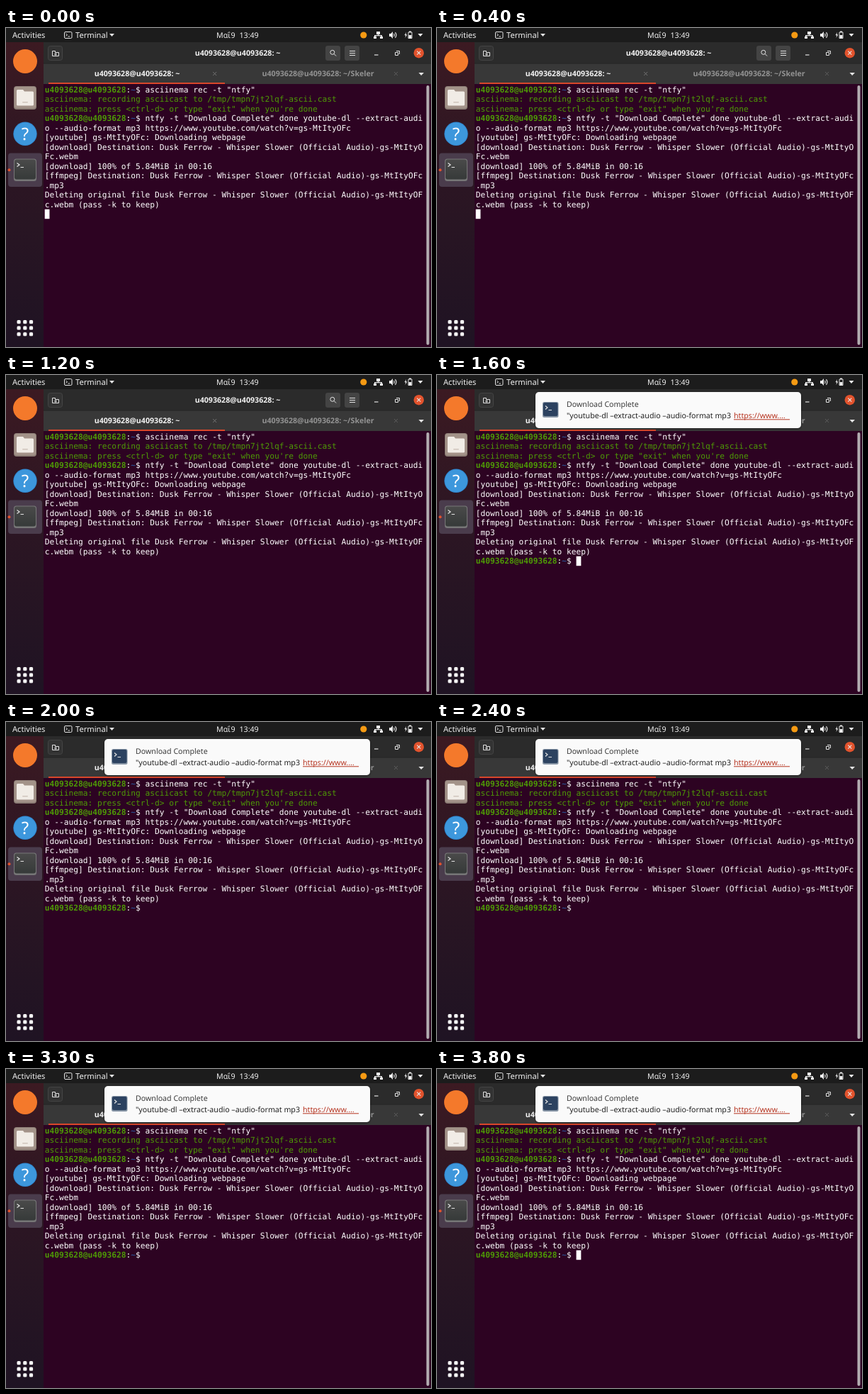
These frames come from a looping animation (600 by 450 pixels, 3900 ms). An HTML page:

```html
<!DOCTYPE html>
<html lang="en">
<head>
<meta charset="utf-8">
<title>Terminal notification</title>
<style>
  html, body { margin: 0; width: 100%; height: 100%; overflow: hidden; background: #2d0322; }
  svg { display: block; width: 600px; height: 450px; }
  text { font: 10.65px "Noto Sans", "Open Sans", sans-serif; fill: #f2f2f2; white-space: pre; text-rendering: geometricPrecision; }
  .mono text { font: 11.225px "DejaVu Sans Mono", monospace; fill: #fff; }
  .mono .user { font-weight: bold; fill: #4e9a06; }
  .mono .info { fill: #4e9a06; }
  .mono .path { fill: #2a62a8; }
  .bold { font-weight: bold; }
  .panel { font-size: 11.15px; }
  .line { fill: none; stroke: #e4e4e4; stroke-width: 1.2; }
  .thin { stroke-width: 1; }
  .faint { stroke: #747474; stroke-width: 1; }
  .button { fill: #444; }
</style>
</head>
<body>
<svg viewBox="0 0 600 450">
  <defs>
    <linearGradient id="dockFill" x2="0" y2="1">
      <stop offset="0" stop-color="#3c1a22"/>
      <stop offset=".4" stop-color="#2d1623"/>
      <stop offset="1" stop-color="#1f1323"/>
    </linearGradient>
    <linearGradient id="darkIcon" x2="0" y2="1">
      <stop offset="0" stop-color="#4a4a4a"/>
      <stop offset="1" stop-color="#363a39"/>
    </linearGradient>
    <filter id="shadow" x="-5%" y="-20%" width="110%" height="150%">
      <feDropShadow dx="0" dy="1" stdDeviation="1.5" flood-opacity=".5"/>
    </filter>
  </defs>
  <rect width="600" height="450" fill="#2d0322"/>

  <g id="window">
    <rect x="53" y="20" width="547" height="30" fill="#2b2b2b"/>
    <rect x="53" y="50" width="547" height="29" fill="#383838"/>
    <path d="M53 50H600" stroke="#222"/>
    <rect x="60" y="77" width="249" height="2" fill="#d9472b"/>
    <rect x="593.5" y="81" width="4" height="366" rx="2" fill="#b3adb1"/>
    <rect x="59.5" y="25.5" width="20" height="20" rx="3" fill="#333" stroke="#444"/>
    <path class="line thin" d="M65.5 39.5V32.5H69.5V34.5H74.5V39.5ZM70 35.2V38.8M68.2 37H71.8"/>
    <rect class="button" x="451" y="25" width="21" height="21" rx="3"/>
    <circle class="line thin" cx="460.8" cy="34.3" r="3"/>
    <path class="line thin" d="M463 36.5L466 39.5"/>
    <rect class="button" x="478" y="25" width="21" height="21" rx="3"/>
    <path class="line thin" d="M485 32.5H493M485 35.5H493M485 38.5H493"/>
    <path class="line" d="M520 38H525.5"/>
    <path class="line thin" d="M549.5 34.5H553.5V38.5H549.5ZM551 32.5H555.5V37"/>
    <circle cx="582.8" cy="35.2" r="7.2" fill="#e2532d"/>
    <path class="line" d="M580.3 32.7L585.3 37.7M585.3 32.7L580.3 37.7"/>
    <text class="bold" x="327" y="39" text-anchor="middle">u4093628@u4093628: ~</text>
    <text class="bold" x="185" y="68.3" text-anchor="middle">u4093628@u4093628: ~</text>
    <text class="bold" x="361.5" y="68.3" style="fill:#929292">u4093628@u4093628: ~/Skeler</text>
    <path class="line faint" d="M292.2 62L297.2 67M297.2 62L292.2 67"/>
    <path class="line faint" d="M548 62L553 67M553 62L548 67" opacity=".6"/>
    <path d="M582.5 63H590L586.2 67Z" fill="#e4e4e4"/>
  </g>

  <g id="screen" class="mono"></g>
  <rect id="cursor" width="6.75" height="13.5" fill="#fff"/>

  <g id="banner">
    <rect x="139" y="24" width="375" height="51" rx="5" fill="#fafafa" filter="url(#shadow)"/>
    <rect x="149" y="38" width="22.5" height="22" rx="2.5" fill="#8795a5"/>
    <rect x="150" y="39" width="20.5" height="19" rx="2" fill="#2c4260"/>
    <path class="line" d="M153 43.5L156 46L153 48.5M157.5 49.5H162"/>
    <text x="183" y="45.3" style="fill:#3b3b3b">Download Complete</text>
    <text x="183" y="61" style="fill:#222">"youtube-dl –extract-audio –audio-format mp3</text>
    <text x="419" y="61" style="fill:#b5331f">https://www.…</text>
    <path d="M419 62.8H498" stroke="#b5331f"/>
  </g>

  <g id="dock">
    <rect y="20" width="53" height="430" fill="url(#dockFill)"/>
    <rect x="3" y="176.5" width="48" height="47.5" rx="4" fill="#4a3c4c"/>
    <circle cx="4.5" cy="200.3" r="2" fill="#e2532d"/>
    <circle cx="27" cy="47" r="17" fill="#f4792b"/>

    <rect x="11" y="82" width="32" height="33" rx="4" fill="#8f8078"/>
    <rect x="12" y="83" width="30" height="30" rx="3" fill="#a39389"/>
    <path d="M15 88.5Q15 87 16.5 87H24L26 89.5H37.5Q39 89.5 39 91V108Q39 109.5 37.5 109.5H16.5Q15 109.5 15 108Z" fill="#f1ece6"/>
    <rect x="23" y="104" width="8" height="1.6" rx=".8" fill="#cfc4bc"/>

    <circle cx="27" cy="149.3" r="16.7" fill="#2f86cf"/>
    <circle cx="27" cy="149.3" r="15.8" fill="#3d97dc"/>
    <text x="27" y="157.8" text-anchor="middle" style="font-size:24px;fill:#fff">?</text>

    <rect x="11" y="184.5" width="32" height="31.5" rx="3.5" fill="#777"/>
    <rect x="12" y="185.5" width="30" height="28" rx="3" fill="url(#darkIcon)"/>
    <path class="line" d="M15.5 190.5L19 193L15.5 195.5M20.5 196.5H25"/>
    <g id="apps" fill="#f5f5f5"></g>
  </g>

  <g id="topBar">
    <rect width="600" height="20" fill="#1c1c1c"/>
    <text class="panel" x="9" y="14">Activities</text>
    <rect class="line thin" x="82.5" y="5.5" width="10.5" height="9" rx="1.5"/>
    <path class="line thin" d="M84.5 8L86.5 9.7L84.5 11.4M87.5 12H90"/>
    <text class="panel" x="98" y="14">Terminal</text>
    <path d="M146 8H153L149.5 12Z" fill="#e4e4e4"/>
    <text x="297" y="13.8">Μαΐ</text>
    <text x="317.5" y="13.8">9</text>
    <text x="329.5" y="13.8">13:49</text>
    <circle cx="504.8" cy="10" r="4.6" fill="#f59a13"/>
    <g fill="#f0f0f0">
      <path d="M523 5H528V9H526V10H531V12H532V15H528V12H529.5V11.2H521.5V12H523V15H519V12H520V10H525V9H523Z"/>
      <path d="M541 8H543.3L546 5V15L543.3 12H541Z"/>
      <path d="M569 4.5H572V6H569ZM568.5 10H572.5V14H568.5Z"/>
      <path d="M565 6L562.5 10.3H564.3L563.5 14L566.2 9.3H564.5Z"/>
      <path d="M581.5 8H588.5L585 12Z"/>
    </g>
    <path class="line thin" d="M568 6H573V14.5H568Z"/>
    <path class="line" d="M547.5 7.8Q549 10 547.5 12.2M549.5 6.2Q552.3 10 549.5 13.8"/>
  </g>
</svg>
<script>
const LOOP = 3900, STEP = 100, DONE = 1300, BLINK = 600;
const LEFT = 54.7, TOP = 80.6, CELL = 6.758, ROW = 13.5;
const byId = id => document.getElementById(id);

function add(parent, tag, attrs, content = "") {
  const node = document.createElementNS("http://www.w3.org/2000/svg", tag);
  for (const name in attrs) node.setAttribute(name, attrs[name]);
  node.textContent = content;
  return parent.appendChild(node);
}

function write(parent, row, column, content, style = "") {
  add(parent, "text", { x: LEFT + column * CELL, y: TOP + row * ROW + 10.2, class: style }, content);
}

function prompt(row, command = "") {
  const line = add(byId("screen"), "g", {});
  write(line, row, 0, "u4093628@u4093628", "user");
  write(line, row, 17, ":");
  write(line, row, 18, "~", "path");
  write(line, row, 19, "$ " + command);
  return line;
}

const title = "Dusk Ferrow - Whisper Slower (Official Audio)-gs-MtItyO";
prompt(0, 'asciinema rec -t "ntfy"');
[
  "asciinema: recording asciicast to /tmp/tmpn7jt2lqf-ascii.cast",
  'asciinema: press <ctrl-d> or type "exit" when you\'re done'
].forEach((line, i) => write(byId("screen"), 1 + i, 0, line, "info"));
prompt(3, 'ntfy -t "Download Complete" done youtube-dl --extract-audi');
[
  "o --audio-format mp3 https://www.youtube.com/watch?v=gs-MtItyOFc",
  "[youtube] gs-MtItyOFc: Downloading webpage",
  "[download] Destination: " + title,
  "Fc.webm",
  "[download] 100% of 5.84MiB in 00:16",
  "[ffmpeg] Destination: " + title + "Fc",
  ".mp3",
  "Deleting original file " + title + "F",
  "c.webm (pass -k to keep)"
].forEach((line, i) => write(byId("screen"), 4 + i, 0, line));
const lastPrompt = prompt(13);

for (let i = 0; i < 9; i++) {
  add(byId("apps"), "rect", { x: 15.5 + i % 3 * 8.7, y: 412 + Math.floor(i / 3) * 8.6, width: 5.2, height: 5.2, rx: 1.5 });
}

const easeOutBack = p => 1 + 2.7 * (p - 1) ** 3 + 1.7 * (p - 1) ** 2;
const show = (node, visible) => node.setAttribute("visibility", visible ? "visible" : "hidden");

function draw(time) {
  const t = Math.floor(time % LOOP / STEP) * STEP;
  const done = t >= DONE;
  const slide = Math.min(1, (t - DONE + 50) / 200);
  const banner = byId("banner"), cursor = byId("cursor");

  show(lastPrompt, done);
  show(banner, done);
  banner.setAttribute("opacity", done ? slide : 0);
  banner.setAttribute("transform", `translate(0 ${done ? 51 * (easeOutBack(slide) - 1) : 0})`);

  cursor.setAttribute("x", LEFT + (done ? 21 * CELL : 0));
  cursor.setAttribute("y", TOP + 13 * ROW - 0.4);
  show(cursor, done ? (t - DONE) % (2 * BLINK) < BLINK : t < 700);
}

const start = performance.now();
function tick() {
  draw(performance.now() - start);
  requestAnimationFrame(tick);
}
tick();
</script>
</body>
</html>
```
